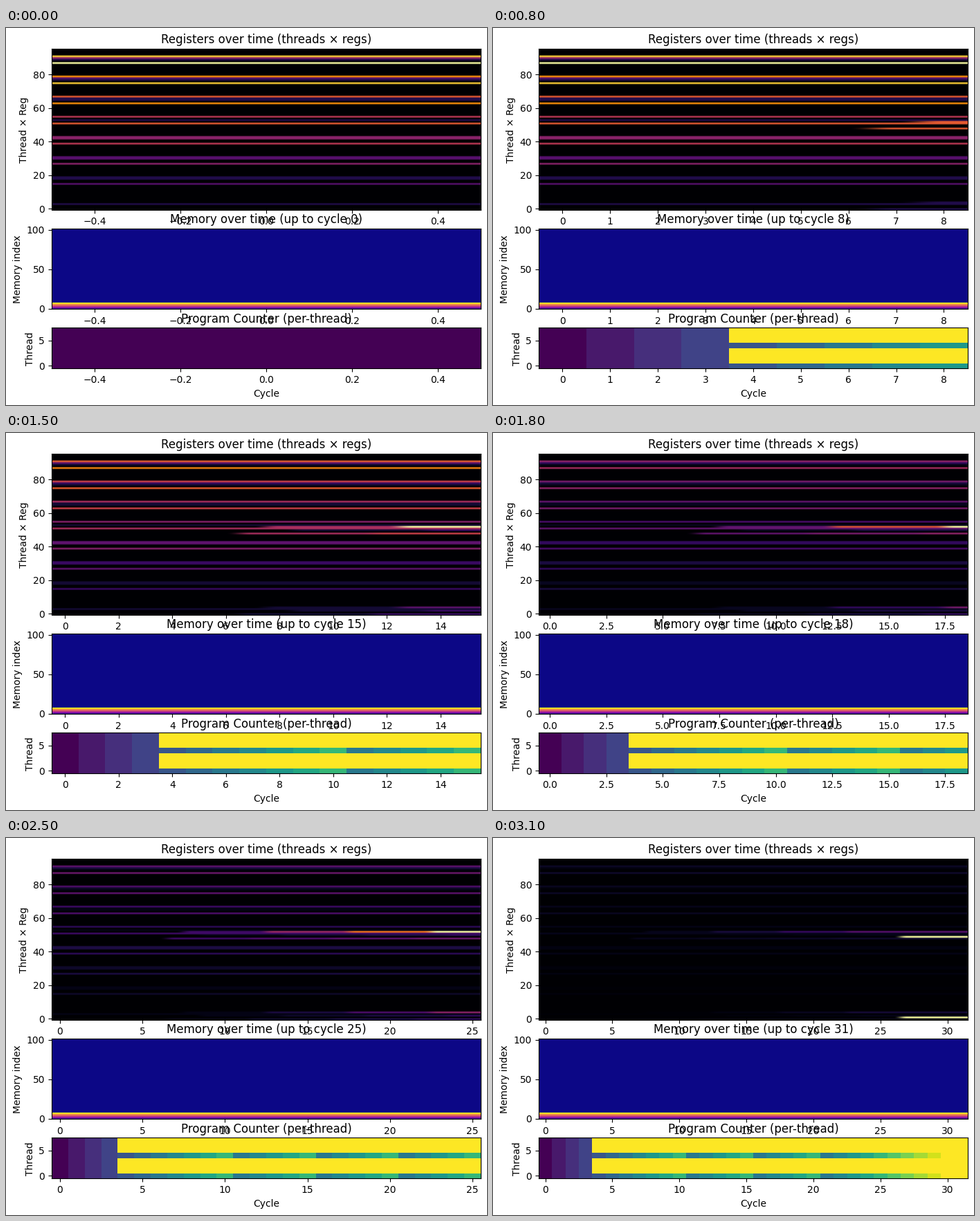
Animation, 695 px wide and 545 px high, one loop 3.2 s. Source, as a matplotlib script:

```python
import numpy as np
import matplotlib.pyplot as plt
from matplotlib.animation import FuncAnimation

W, H, DPI = 695, 545, 100
LEFT, BOTTOM, PLOT_W, PLOT_H = 65.9, 53.278, 620, 462
DROP = 0.61  # labels sit this many pixels lower than the default
CYCLES, THREADS, REGS, BLOCK, CELLS = 32, 8, 12, 4, 102
LOOP, END, OUT = 7, 16, 100


def step(pc, t, r, mem, shared):
    """Run one instruction of thread t on its registers r; return the next pc."""
    block = t // BLOCK
    if pc == 0:
        r[3] = mem[r[7]]
    elif pc == 1:
        shared[block, r[6]] = r[3]
    elif pc == 4 and r[6] != 0:
        return END
    elif pc == LOOP:
        r[0] = shared[block, r[2]]
    elif pc == 8:
        r[4] += r[0]
    elif pc == 9:
        r[2] += 1
    elif pc == 11 and r[2] < BLOCK:
        return LOOP
    elif pc == 12:
        r[1] = OUT
    elif pc == 13:
        r[1] += r[5]
    elif pc == 14:
        mem[r[1]] = 1
    return min(pc + 1, END)


def simulate():
    tid = np.arange(THREADS)
    regs = np.zeros((THREADS, REGS), int)
    regs[:, 5], regs[:, 6], regs[:, 7] = tid // BLOCK, tid % BLOCK, tid
    mem = np.zeros(CELLS, int)
    mem[:THREADS] = tid + 1
    shared = np.zeros((THREADS // BLOCK, BLOCK), int)
    pcs = np.zeros(THREADS, int)
    reg_log, mem_log, pc_log = [], [], []
    for _ in range(CYCLES):
        for t in tid:
            pcs[t] = step(pcs[t], t, regs[t], mem, shared)
        reg_log.append(regs.ravel().copy())
        mem_log.append(mem.copy())
        pc_log.append(pcs.copy())
    return [np.array(log).T for log in (reg_log, mem_log, pc_log)]


reg_hist, mem_hist, pc_hist = simulate()

drop_pt = DROP * 72 / DPI
plt.rcParams.update({"font.family": "DejaVu Sans",
                     "axes.titlepad": 6 - drop_pt,
                     "xtick.major.pad": 3.5 + drop_pt})
fig, axes = plt.subplots(
    3, 1, figsize=(W / DPI, H / DPI), dpi=DPI,
    gridspec_kw=dict(height_ratios=[4, 2, 1], hspace=0.2,
                     left=LEFT / W, right=(LEFT + PLOT_W) / W,
                     bottom=BOTTOM / H, top=(BOTTOM + PLOT_H) / H))


def panel(ax, data, cmap, title, ylabel, stage="data"):
    ax.clear()
    ax.imshow(data, aspect="auto", origin="lower", cmap=cmap,
              interpolation_stage=stage)
    ax.set_title(title)
    ax.set_ylabel(ylabel, y=0.5 - DROP / ax.bbox.height)


def draw(cycle):
    n = cycle + 1
    panel(axes[0], reg_hist[:, :n], "inferno",
          "Registers over time (threads × regs)", "Thread × Reg", "rgba")
    panel(axes[1], mem_hist[:, :n], "plasma",
          f"Memory over time (up to cycle {cycle})", "Memory index", "rgba")
    panel(axes[2], pc_hist[:, :n], "viridis",
          "Program Counter (per-thread)", "Thread")
    axes[2].set_xlabel("Cycle")
    return []


anim = FuncAnimation(fig, draw, frames=CYCLES, init_func=lambda: draw(0),
                     interval=100, repeat=True, repeat_delay=0, blit=False)
plt.show()
```
